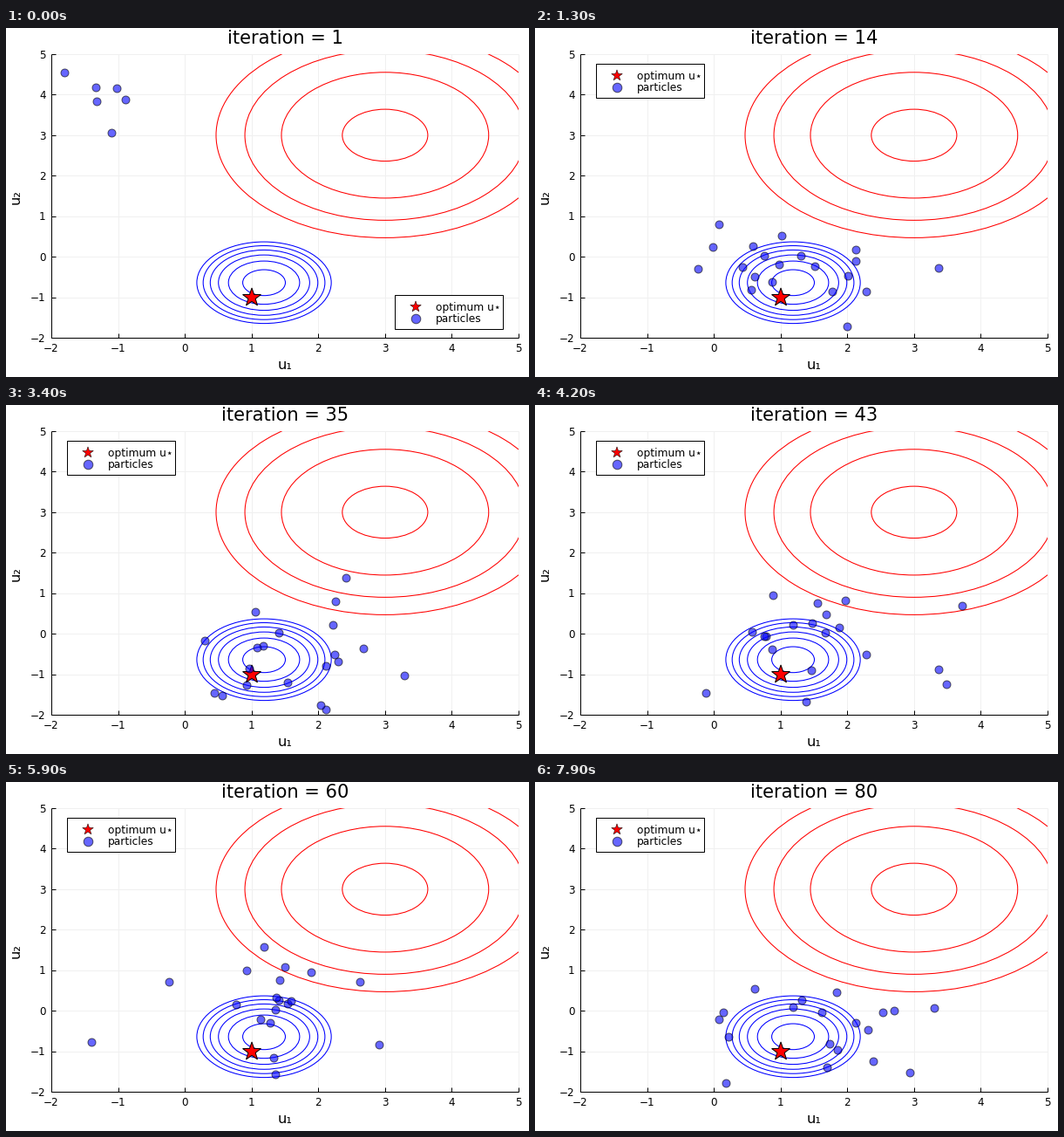
A matplotlib script for the animation above (8 s loop, 600 by 400 pixels).

```python
import numpy as np
import matplotlib.pyplot as plt
from matplotlib.animation import FuncAnimation
from matplotlib.patches import Ellipse, Polygon, Rectangle

plt.rcParams["font.family"] = "DejaVu Sans"

W, H, DPI = 600, 400, 100
PX = 72 / DPI                      # points per pixel
L, R, T, B = 52, 588, 30, 355      # plot area
SX, SY = (R - L) / 7, (B - T) / 7  # pixels per unit
FRAMES, COUNT = 80, 20
LEGEND_MOVE, ARRIVE = 3, 13
BLUE, EDGE = (0, 0, 1, 0.6), (0, 0, 0, 0.6)


def px(x):
    return L + (x + 2) * SX


def py(y):
    return B - (y + 2) * SY


fig = plt.figure(figsize=(W / DPI, H / DPI), dpi=DPI, facecolor="white")
ax = fig.add_axes([0, 0, 1, 1])
ax.set_xlim(0, W)
ax.set_ylim(H, 0)
ax.axis("off")
area = Rectangle((L, T), R - L, B - T, fc="none", ec="none")
ax.add_patch(area)


def line(xs, ys, color="black", z=2):
    ax.plot(xs, ys, color=color, lw=PX, zorder=z, solid_capstyle="butt")


def label(x, y, s, size, ha="center", **kw):
    return ax.text(x, y, s, fontsize=size * PX, ha=ha, va="baseline", **kw)


def rings(x, y, radii, color):
    for r in radii:
        ring = Ellipse((px(x), py(y)), 2 * r * SX, 2 * r * SY,
                       fc="none", ec=color, lw=0.76, zorder=3)
        ax.add_patch(ring)
        ring.set_clip_path(area)


def star_points(x, y, r):
    a = np.arange(10) * np.pi / 5
    rad = np.where(np.arange(10) % 2, 0.4 * r, r)
    return np.column_stack([x + rad * np.sin(a), y - rad * np.cos(a)])


def star(x, y, r, edge, z):
    return ax.add_patch(Polygon(star_points(x, y, r), fc="red", ec="black",
                                lw=edge * PX, zorder=z))


def dots(r, z):
    return ax.scatter([], [], s=(2 * r * PX) ** 2, color=[BLUE],
                      edgecolors=[EDGE], linewidths=PX, zorder=z, snap=False)


# Axes
for v in range(-2, 6):
    x, y, s = px(v), py(v), str(v).replace("-", "\u2212")
    line([x, x], [T, B], "#f0f0f0", 1)
    line([L, R], [y, y], "#f0f0f0", 1)
    line([x, x], [B, B - 5])
    line([L, L + 5], [y, y])
    label(x, 371, s, 12)
    label(45.5, y + 4.7, s, 12, "right")
line([L, L], [T, B])
line([L, R], [B, B])
label(320, 391.4, "u\u2081", 16.4)
label(15.5, 193, "u\u2082", 16.4, rotation=90, rotation_mode="anchor")
title = label(320, 17.8, "", 21)

# Contours and optimum
rings(3, 3, np.sqrt(0.41 + 2 * np.arange(4)), "red")
rings(1.187, -0.64, np.sqrt(0.102 + 0.1825 * np.arange(6)), "blue")
star(px(1) + 0.3, py(-1) + 0.4, 11, 1, 4)
swarm = dots(4.5, 5)
swarm.set_clip_path(area)

# Legend
box = ax.add_patch(Rectangle((0, 0), 124, 39, fc="white", ec="black",
                             lw=PX, zorder=6))
key_star = star(0, 0, 6.6, 0.5, 7)
key_dot = dots(5.3, 7)
key_names = [label(0, 0, s, 12.2, "left", zorder=7)
             for s in ("optimum u\u22c6", "particles")]


def place_legend(x, y):
    box.set_xy((x, y))
    key_star.set_xy(star_points(x + 24, y + 13.5, 6.6))
    key_dot.set_offsets([(x + 24, y + 26.5)])
    for text, dy in zip(key_names, (18, 31)):
        text.set_position((x + 46.8, y + dy))


# Swarm: a mean-reverting random walk, scaled to a drifting cloud
rng = np.random.default_rng(7)
walk = rng.normal(size=(FRAMES, COUNT, 2))
for i in range(1, FRAMES):
    walk[i] = 0.75 * walk[i - 1] + 0.66 * walk[i]
walk -= walk.mean(axis=1, keepdims=True)
walk /= walk.std(axis=1, keepdims=True)

# time, centre x, centre y, spread x, spread y
cloud = np.array([(13, 1.2, -0.25, 0.9, 0.55), (25, 1.25, 0, 0.9, 0.6),
                  (34, 1.65, -0.55, 0.8, 0.85), (49, 1.5, 0, 1.15, 0.95),
                  (69, 0.95, 0.1, 0.6, 0.95), (79, 1.6, -0.5, 0.95, 0.75)])

# A few particles start in view, the rest beyond the corner
seen = [(-1.81, 4.55), (-1.34, 4.2), (-1.03, 4.17), (-1.33, 3.84),
        (-0.89, 3.88), (-1.11, 3.08)]
hidden = rng.uniform((-3.4, 5.3), (-0.8, 6.6), (COUNT - len(seen), 2))
hidden[::2] = rng.uniform((-3.6, 3.4), (-2.2, 5.5), hidden[::2].shape)
start = np.vstack([seen, hidden])


def swarm_at(i):
    cx, cy, sx, sy = (np.interp(i, cloud[:, 0], c) for c in cloud.T[1:])
    spot = np.array([cx, cy]) + walk[i] * (sx, sy)
    ease = 1 - (1 - min(i / ARRIVE, 1)) ** 2.5
    return start + ease * (spot - start)


def update(i):
    title.set_text(f"iteration = {i + 1}")
    x, y = swarm_at(i).T
    swarm.set_offsets(np.column_stack([px(x) + 0.4, py(y) + 0.4]))
    place_legend(*((446, 306) if i < LEGEND_MOVE else (70, 41)))
    return ()


anim = FuncAnimation(fig, update, frames=FRAMES, interval=100,
                     init_func=lambda: update(0), repeat=True, repeat_delay=0)
plt.show()
```
